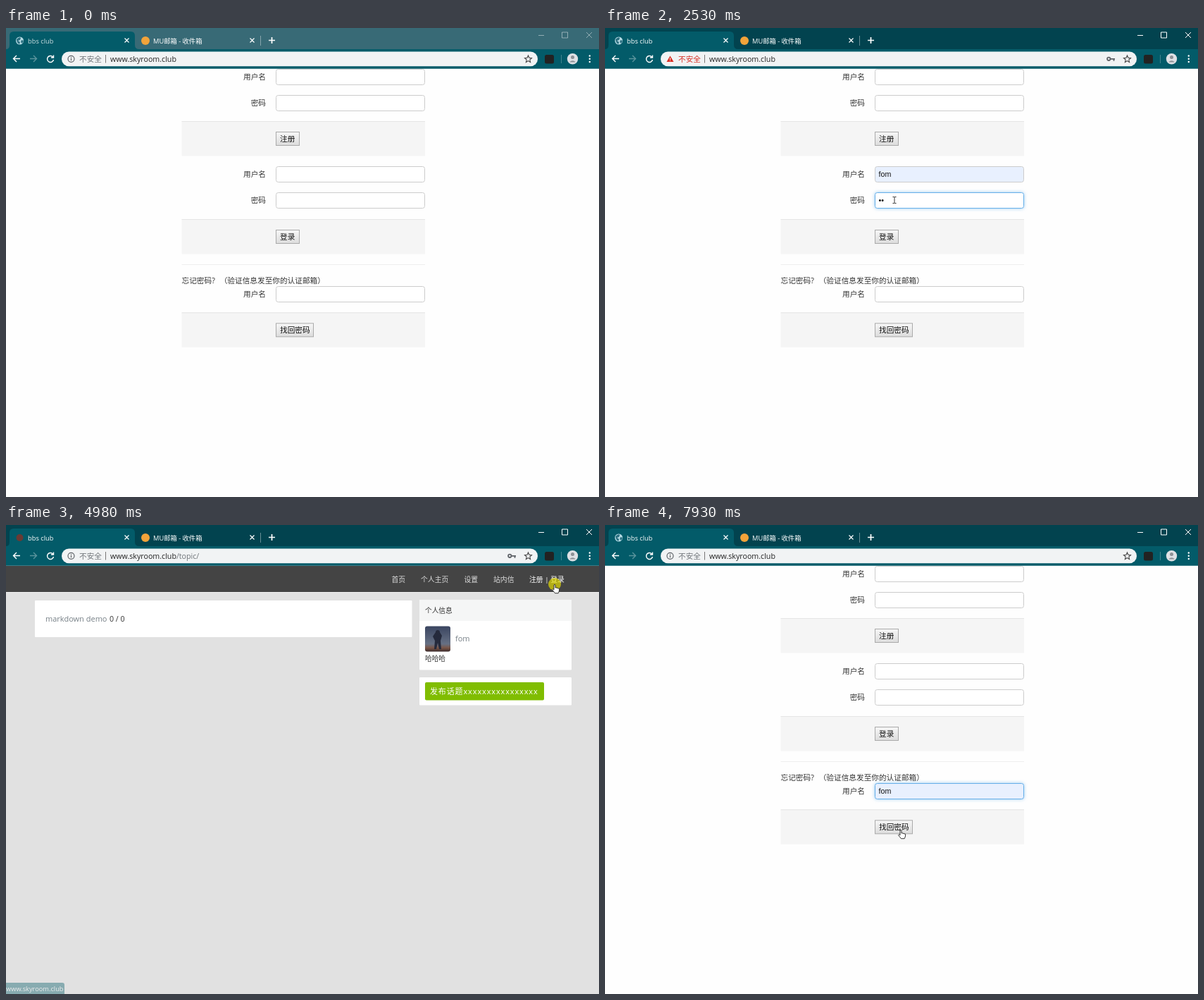
Animation, 842 px wide and 665 px high, one loop 8000 ms. Source, as an HTML page:

```html
<!DOCTYPE html>
<html lang="zh-CN">
<head>
<meta charset="utf-8">
<title>bbs club</title>
<style>
html, body { margin: 0; width: 100%; height: 100%; overflow: hidden; background: #fefefe; }
svg { display: block; width: 842px; height: 665px; }
text { font: 10.66px "Open Sans", "Noto Sans CJK SC", sans-serif; fill: #333; white-space: pre; }
.tab text { font-size: 9.3px; fill: #fff; }
.line { fill: none; stroke: #fff; }
.field { fill: #fff; stroke: #ccc; }
.filled { fill: #e8f0fe; }
.focus { stroke: #66afe9; filter: drop-shadow(0 0 2.5px #66afe9aa); }
.value { font-family: "Liberation Sans", Arial, sans-serif; fill: #111; }
#menu text { font-size: 9.55px; }
#topic .nav { font-size: 9.85px; fill: #ddd; }
#topic .link { font-size: 11px; fill: #778087; }
</style>
</head>
<body>
<svg viewBox="0 0 842 665">
  <defs>
    <linearGradient id="btn" x2="0" y2="1"><stop stop-color="#f7f7f7"/><stop offset="1" stop-color="#dcdcdc"/></linearGradient>
    <linearGradient id="sky" x2="0" y2="1"><stop stop-color="#3a4560"/><stop offset=".7" stop-color="#667084"/><stop offset=".85" stop-color="#7a5648"/><stop offset="1" stop-color="#3c2b2c"/></linearGradient>
  </defs>

  <g id="login"><rect y="57" width="842" height="608" fill="#fefefe"/></g>

  <g id="topic">
    <rect y="57" width="842" height="608" fill="#e1e1e1"/>
    <rect y="58" width="842" height="37.5" fill="#444"/>
    <rect y="95" width="842" height="1" fill="#f2f2f2"/>
    <text class="nav" x="547.5" y="80.5">首页</text>
    <text class="nav" x="589" y="80.5">个人主页</text>
    <text class="nav" x="650.5" y="80.5">设置</text>
    <text class="nav" x="692" y="80.5">站内信</text>
    <text class="nav" id="sign" x="743" y="80.5">注册 | 登录</text>
    <g fill="#fff">
      <rect x="41" y="107" width="535.5" height="52" rx="1"/>
      <rect x="587" y="106" width="216" height="99.5" rx="1"/>
      <rect x="587" y="216" width="216" height="39.5" rx="1"/>
    </g>
    <text class="link" x="56" y="137">markdown demo</text>
    <text x="147" y="136.5">0 / 0</text>
    <rect x="587" y="106" width="216" height="30" fill="#f5f6f6"/>
    <text x="595" y="125" style="font-size:9.7px">个人信息</text>
    <rect x="595" y="143.5" width="36" height="36" rx="3" fill="url(#sky)"/>
    <path d="M610 152a3 3 0 0 1 6 0l3 5-2 7 1 12h-3l-2-9-2 9h-3l1-12-3-6z" fill="#252a3c"/>
    <text class="link" x="638" y="165">fom</text>
    <text x="595" y="193" style="font-size:9.7px">哈哈哈</text>
    <rect x="595" y="223" width="169" height="25.5" rx="2" fill="#80bd01"/>
    <text x="602" y="240" style="font-size:11px;letter-spacing:.87px;fill:#fff">发布话题xxxxxxxxxxxxxxxx</text>
    <g id="status">
      <path d="M0 649h80q3 0 3 3v13H0z" fill="#035b69"/>
      <text x="0" y="660.5" style="font-size:9.25px;fill:#fff">www.skyroom.club</text>
    </g>
  </g>

  <g id="menu">
    <rect x="382.5" width="212" height="66" rx="2" fill="#fff" style="filter:drop-shadow(0 1px 1.5px #0007)"/>
    <rect id="hover" x="383" y="6" width="211" height="27" fill="#eee"/>
    <text x="391.5" y="22.5">fom</text>
    <text x="391.5" y="49.5">fom11</text>
  </g>

  <rect id="title" width="842" height="31"/>
  <path d="M0 30q5 0 5-6V11q0-6 6-6H177q6 0 6 6v13q0 6 6 6H842V57.7H0z" fill="#035b69"/>
  <g class="tab">
    <text id="name" x="31" y="21.5"></text>
    <text x="209" y="21.5">MU邮箱 - 收件箱</text>
  </g>
  <g id="globe">
    <circle cx="19.5" cy="18" r="5.5" fill="#b5dbe4"/>
    <path d="M15 16q4-4 6-2l-1 3-3 1 3 2-1 3q-4-2-4-7zM22 17l3 1-2 4-2-2z" fill="#2b6f80"/>
  </g>
  <circle id="icon" cx="19.5" cy="18" r="5" fill="#6a3a34"/>
  <circle id="spin" class="line" cx="19.5" cy="18" r="5" stroke-width="1.5" style="stroke:#a9d5dd"/>
  <circle cx="198" cy="18" r="6" fill="#f2a33a"/>
  <path class="line" d="M168.500 14.500l6 6m0-6l-6 6M346.500 14.500l6 6m0-6l-6 6" stroke-width="1.2"/>
  <path class="line" d="M361.500 11v14" opacity=".4"/>
  <path class="line" d="M377.500 13v9m-4.500-4.500h9" stroke-width="1.7"/>
  <path class="line" id="controls" d="M756 10.500h8M789.500 6h8v8h-8zM824 6l8 8m0-8l-8 8"/>

  <g class="line" stroke-width="1.4">
    <path d="M20 43.500h-9.500m4.500-4.500l-4.500 4.500 4.500 4.500"/>
    <path d="M34 43.500h9.500m-4.500-4.500l4.500 4.500-4.500 4.500" opacity=".35"/>
    <path id="reload" d="M66.500 41a4.500 4.500 0 1 0 1 4M67.500 38.500v3.500h-3.500"/>
    <path id="stop" d="M58.500 39.500l8 8m0-8l-8 8"/>
  </g>
  <rect x="79" y="33.500" width="676" height="20.800" rx="10.400" fill="#f1f3f4"/>
  <g id="info" fill="none" stroke="#5f6368" stroke-width="1.200">
    <circle cx="92.500" cy="43.800" r="4.500"/><path d="M92.500 43v3.300M92.500 41v1.200"/>
  </g>
  <g id="warn"><path d="M92.500 39.500l5 8.500h-10z" fill="#d93025"/><path d="M92.500 42.500v2.500m0 .8v1" stroke="#fff"/></g>
  <text id="safe" x="104" y="47.800">不安全</text>
  <path d="M141.500 38v11.500" stroke="#777"/>
  <text x="148" y="47.500" style="fill:#222">www.skyroom.club<tspan id="path" fill="#70757a">/topic/</tspan></text>
  <g id="key" fill="none" stroke="#5f6368" stroke-width="1.800"><circle cx="715.300" cy="43.800" r="2.200"/><path d="M717.500 43.800h6.500m-1.500 0v3"/></g>
  <path d="M741.500 39l1.400 3.300 3.600.3-2.700 2.400.8 3.500-3.100-1.900-3.100 1.900.8-3.500-2.700-2.400 3.600-.3z" fill="none" stroke="#444" stroke-width="1.100"/>
  <rect x="765" y="38" width="13" height="12.500" rx="2.500" fill="#222"/>
  <path class="line" d="M788.500 38v12" opacity=".25"/>
  <circle cx="804.500" cy="43.800" r="7.700" fill="#dfe1e5"/>
  <path d="M800 48.500q4.500-4.500 9 0zM802 41.500a2.500 2.500 0 0 1 5 0 2.500 2.500 0 0 1-5 0" fill="#8d9196"/>
  <g fill="#fff"><circle cx="828.800" cy="39.500" r="1.200"/><circle cx="828.800" cy="43.800" r="1.200"/><circle cx="828.800" cy="48" r="1.200"/></g>

  <g id="cursor">
    <circle id="click" r="9" fill="#f0e600" opacity=".65"/>
    <path id="arrow" d="M.5.500v10l2.300-2.200 1.700 3.700 1.500-.7-1.700-3.600h3z" fill="#fff" stroke="#222" stroke-width=".9"/>
    <path id="beam" d="M-2.500-4.500h2l.5.500.5-.5h2M0-4V4M-2.500 4.500h2l.5-.5.5.5h2" fill="none" stroke="#333"/>
    <path id="hand" d="M-1 1q1-1.500 2 0v4q1.500-.8 2 .4 1.400-.6 2 .5 1.600-.3 1.700 1.200 0 3-1.500 5.600H.5l-4-5q.5-1.700 2.500 0z" fill="#fff" stroke="#222" stroke-width=".9"/>
  </g>
</svg>
<script>
const $ = id => document.getElementById(id);
const show = (id, on) => $(id).style.display = on ? '' : 'none';
const LOOP = 8000;
const fieldY = [58.5, 95.5, 196.5, 233.5, 366.5];

// Login page
const band = (y, label, w) => `
  <rect x="249.5" y="${y}" width="345.5" height="49.5" fill="#f5f5f5"/>
  <path d="M249.5 ${y + .5}h345.500" stroke="#e5e5e5"/>
  <rect x="383.5" y="${y + 15.5}" width="${w}" height="19" fill="url(#btn)" stroke="#aaa"/>
  <text x="389" y="${y + 28.5}" style="fill:#111">${label}</text>`;
const field = (y, i) => `
  <text x="369" y="${y + 14}" text-anchor="end">${i % 2 ? '密码' : '用户名'}</text>
  <rect id="field${i}" x="383.5" y="${y}" width="211" height="22" rx="3"/>
  <text class="value" id="value${i}" x="388.5" y="${y + 14.5}"></text>`;
$('login').innerHTML +=
  band(132, '注册', 33) + band(271, '登录', 33) + band(403.3, '找回密码', 53) +
  `<path d="M249.5 335.5h345.500" stroke="#eee"/>
   <text x="249.5" y="362.3">忘记密码?</text><text x="303.7" y="362.3">（验证信息发至你的认证邮箱）</text>` +
  fieldY.map(field).join('') +
  '<path id="caret" stroke="#111"/>';

// Pointer path: time, x, y
const route = [
  [100, 640, 640], [850, 560, 244], [970, 560, 244], [1190, 411, 207], [1410, 411, 207],
  [1520, 411, 244], [3190, 411, 244], [3290, 404, 299], [3720, 404, 299], [4400, 600, 268],
  [4840, 779, 84], [5090, 779, 84], [5720, 560, 372], [5820, 560, 372], [6030, 487, 377],
  [6710, 487, 377], [6930, 430, 408], [7150, 430, 408], [7470, 405, 428], [7590, 405, 428],
  [7930, 420, 432], [LOOP, 420, 432]
];
const clicks = [1410, 1850, 3620, 4980, 6030, 7150];
const within = (t, a, b) => t >= a && t < b;

function pointer(t) {
  const i = Math.max(1, route.findIndex(p => p[0] > t));
  const [a, x, y] = route[i - 1], [b, u, v] = route[i];
  const p = Math.max(0, (t - a) / (b - a)), e = p * p * (3 - 2 * p);
  return [x + (u - x) * e, y + (v - y) * e];
}

function drawFields(t) {
  const focus = within(t, 1410, 1850) ? 2 : within(t, 1850, 3720) ? 3 : t >= 6030 ? 4 : -1;
  const dots = [2290, 2510, 2730].filter(s => t >= s).length;
  const values = ['', '', within(t, 1520, 5090) ? 'fom' : '', t < 5090 ? '•'.repeat(dots) : '', t >= 6930 ? 'fom' : ''];
  values.forEach((v, i) => {
    $('value' + i).textContent = v;
    $('field' + i).setAttribute('class', 'field' + (v && i !== 3 ? ' filled' : '') + (i === focus ? ' focus' : ''));
  });
  const start = { 2: 1410, 3: 1850, 4: 6030 }[focus];
  show('caret', focus > 0 && (t - start) % 1060 < 530 && t < 7150);
  if (focus > 0) {
    const x = 389.5 + (focus === 3 ? dots * 3.75 : values[focus] ? 17.5 : 0);
    $('caret').setAttribute('d', `M${x} ${fieldY[focus] + 5.5}v11`);
  }
  const first = within(t, 1410, 1630), open = first || within(t, 6140, 7150);
  show('menu', open);
  $('menu').setAttribute('transform', `translate(0 ${fieldY[first ? 2 : 4] + 22.5})`);
  show('hover', t >= 6850 || within(t, 1500, 1630));
  return open;
}

function drawBrowser(t, topic) {
  const active = t >= 100, warn = within(t, 2290, 3720);
  const begin = topic ? 3720 : 5090, loading = within(t, 3720, 4300) || within(t, 5090, 5400);
  $('title').setAttribute('fill', active ? '#02434f' : '#386a76');
  $('controls').setAttribute('opacity', active ? 1 : .45);
  $('name').setAttribute('opacity', active ? 1 : .8);
  $('name').textContent = within(t, 3720, 4000) ? 'www.skyroom.club/topic/' : 'bbs club';
  show('globe', !topic && !loading);
  show('icon', topic && !loading);
  show('spin', loading);
  $('spin').setAttribute('stroke-dasharray', `${Math.min(18, .8 + (t - begin) / 30)} 40`);
  $('spin').setAttribute('transform', `rotate(${(t - begin) * .4 - 95} 19.5 18)`);
  show('reload', !loading);
  show('stop', loading);
  show('warn', warn);
  show('info', !warn);
  $('safe').style.fill = warn ? '#d93025' : '#70757a';
  show('path', topic);
  show('key', within(t, 2290, 5090));
}

function draw(t) {
  const topic = within(t, 3720, 5090);
  const open = drawFields(t);
  drawBrowser(t, topic);
  show('login', !topic);
  show('topic', topic);
  $('status').setAttribute('opacity', Math.max(0, Math.min(.4, (t - 4840) / 300)));
  $('sign').style.fill = t >= 4820 ? '#fff' : '';

  const [x, y] = pointer(t);
  const over = (a, b, c, d) => x >= a && x <= b && y >= c && y <= d;
  const beam = !topic && !open && fieldY.some(f => over(383, 595, f, f + 22));
  const hand = topic ? over(743, 793, 70, 90)
    : over(383, 416, 286, 306) || !open && over(383, 437, 418, 438);
  show('cursor', t >= 100);
  $('cursor').setAttribute('transform', `translate(${x} ${y})`);
  show('beam', beam);
  show('hand', hand);
  show('arrow', !beam && !hand);
  show('click', clicks.some(c => within(t, c, c + 110)) && !within(t, 3720, 3800));
}

const origin = performance.now();
function tick() {
  draw((performance.now() - origin) % LOOP);
  requestAnimationFrame(tick);
}
tick();
</script>
</body>
</html>
```
